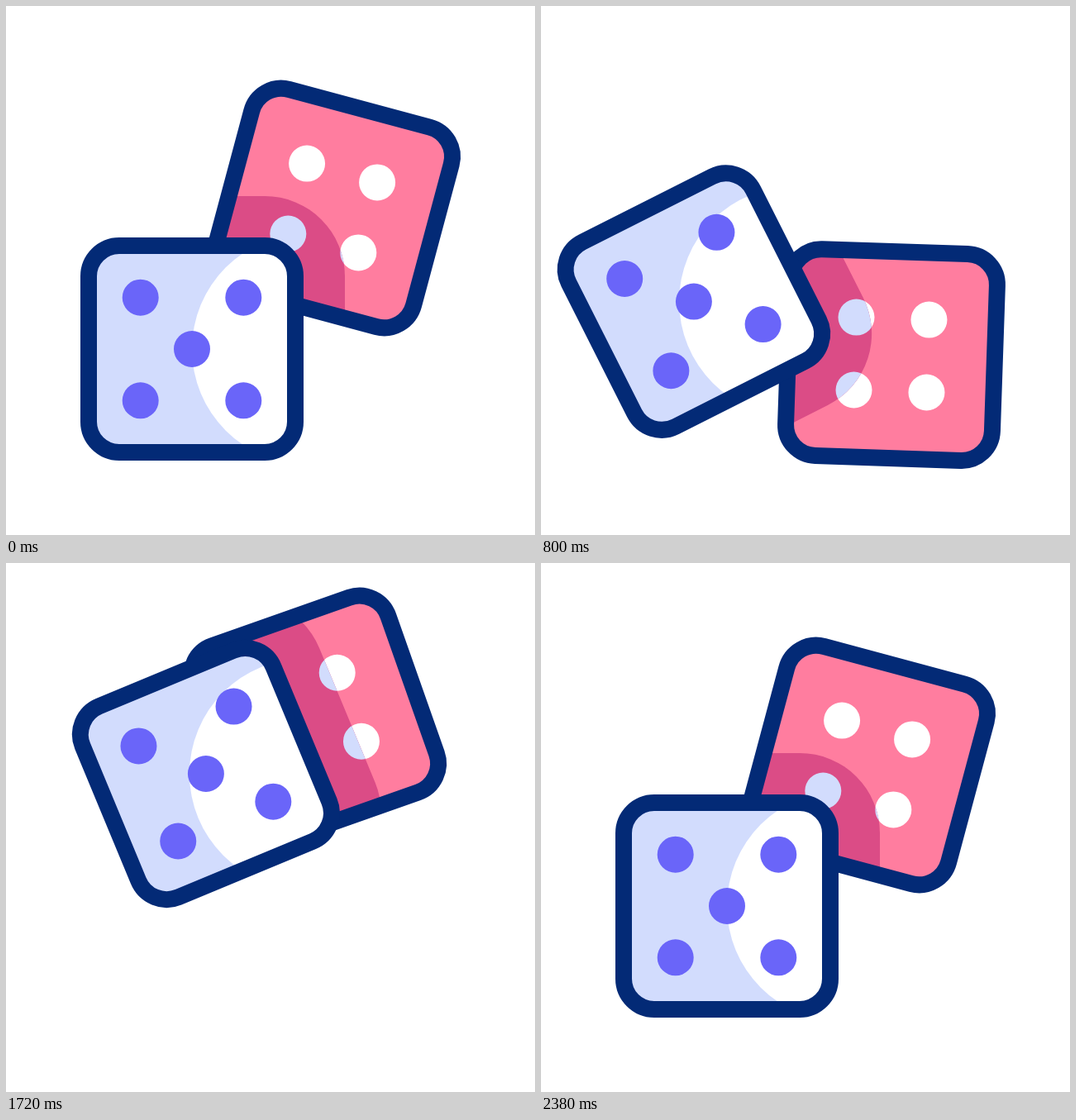
Write an HTML page with a canvas that moves like this. It is 640x640 px and loops after 2400 ms.

```html
<!DOCTYPE html>
<html lang="en">
<head>
<meta charset="utf-8">
<title>Rolling dice</title>
<style>
  html, body { margin: 0; width: 100%; height: 100%; overflow: hidden; background: #fff; }
  canvas { display: block; width: 640px; height: 640px; }
</style>
</head>
<body>
<canvas id="stage" width="640" height="640"></canvas>
<script>
const ctx = document.getElementById('stage').getContext('2d');
const LOOP = 2400, START = 100;
const NAVY = '#032a76', PALE = '#d2dcfd', WHITE = '#ffffff';
const VIOLET = '#6a65f9', PINK = '#ff7d9f', SHADE = '#db4c86';
const DOT = 22, HALF = 125, CORNER = 37, EDGE = 20, SHADOW_REACH = 60, GLOW = 139.5;
const STILL = { x: 0, y: 0, turn: 0, drift: 0 };

// A die moves at constant speed from one offset to the next; drift shifts its highlight.
class Die {
  constructor(x, y, tilt) {
    Object.assign(this, { x, y, tilt, moves: [{ at: START, ...STILL }] });
  }

  to(at, offset) {
    this.moves.push({ at, ...STILL, ...offset });
    return this;
  }

  pose(t) {
    let from = this.moves[0], next = from;
    for (const move of this.moves) {
      from = next;
      next = move;
      if (t < move.at) break;
    }
    const u = Math.min(1, Math.max(0, (t - from.at) / (next.at - from.at || 1)));
    const mix = name => from[name] + (next[name] - from[name]) * u;
    return {
      x: this.x + mix('x'),
      y: this.y + mix('y'),
      angle: (this.tilt + mix('turn')) * Math.PI / 180,
      drift: mix('drift')
    };
  }
}

// Both dice dip, swing outwards, get tossed up and come back to rest.
const frontDie = new Die(225, 415, 0)
  .to(400, { y: 74, turn: 9 })
  .to(940, { x: -54, y: -103, turn: -39.2, drift: -24 })
  .to(1500, { x: 25.4, y: -240.5, turn: 56.1, drift: -30 })
  .to(2160, { turn: 90 });
const backDie = new Die(395.2, 244.5, 15)
  .to(600, { y: 225, turn: 44.3 })
  .to(1100, { x: 71.6, y: 107, turn: 125.5 })
  .to(1800, { x: -33.2, y: -76.3, turn: 46.7 })
  .to(2327, STILL);

const corners = reach => [0, 1, 2, 3].map(i => [
  i % 2 ? reach : -reach,
  i < 2 ? -reach : reach
]);
const FOUR = corners(44);
const FIVE = [[0, 0], ...corners(62.3)];

// Rounded square around a die, grown outwards by the given distance.
function bodyPath(pose, grow = 0) {
  const path = new Path2D(), square = new Path2D(), half = HALF + grow;
  square.roundRect(-half, -half, half * 2, half * 2, CORNER + grow);
  path.addPath(square, new DOMMatrix()
    .translate(pose.x, pose.y)
    .rotate(pose.angle * 180 / Math.PI));
  return path;
}

function dotsPath(pose, spots) {
  const path = new Path2D();
  const c = Math.cos(pose.angle), s = Math.sin(pose.angle);
  for (const [px, py] of spots) {
    const x = pose.x + px * c - py * s, y = pose.y + px * s + py * c;
    path.moveTo(x + DOT, y);
    path.arc(x, y, DOT, 0, Math.PI * 2);
  }
  return path;
}

function fill(path, color) {
  ctx.fillStyle = color;
  ctx.fill(path);
}

function within(path, paint) {
  ctx.save();
  ctx.clip(path);
  paint();
  ctx.restore();
}

function outline(path) {
  ctx.strokeStyle = NAVY;
  ctx.lineWidth = EDGE;
  ctx.stroke(path);
}

function drawBack(pose, front) {
  const body = bodyPath(pose), dots = dotsPath(pose, FOUR);
  fill(body, PINK);
  fill(dots, WHITE);
  within(body, () => {
    const shadow = bodyPath(front, SHADOW_REACH);
    fill(shadow, SHADE);
    within(shadow, () => fill(dots, PALE));
  });
  outline(body);
}

function drawFront(pose) {
  const body = bodyPath(pose), glow = new Path2D();
  const glowX = pose.x + pose.drift + GLOW;
  glow.arc(glowX, pose.y, GLOW, 0, Math.PI * 2);
  // Everything to the right of the curve stays lit.
  glow.rect(glowX, pose.y - GLOW, GLOW, GLOW * 2);
  fill(body, PALE);
  within(body, () => fill(glow, WHITE));
  fill(dotsPath(pose, FIVE), VIOLET);
  outline(body);
}

function draw() {
  const t = performance.now() % LOOP;
  const front = frontDie.pose(t);
  ctx.fillStyle = WHITE;
  ctx.fillRect(0, 0, 640, 640);
  drawBack(backDie.pose(t), front);
  drawFront(front);
  requestAnimationFrame(draw);
}
draw();
</script>
</body>
</html>
```
